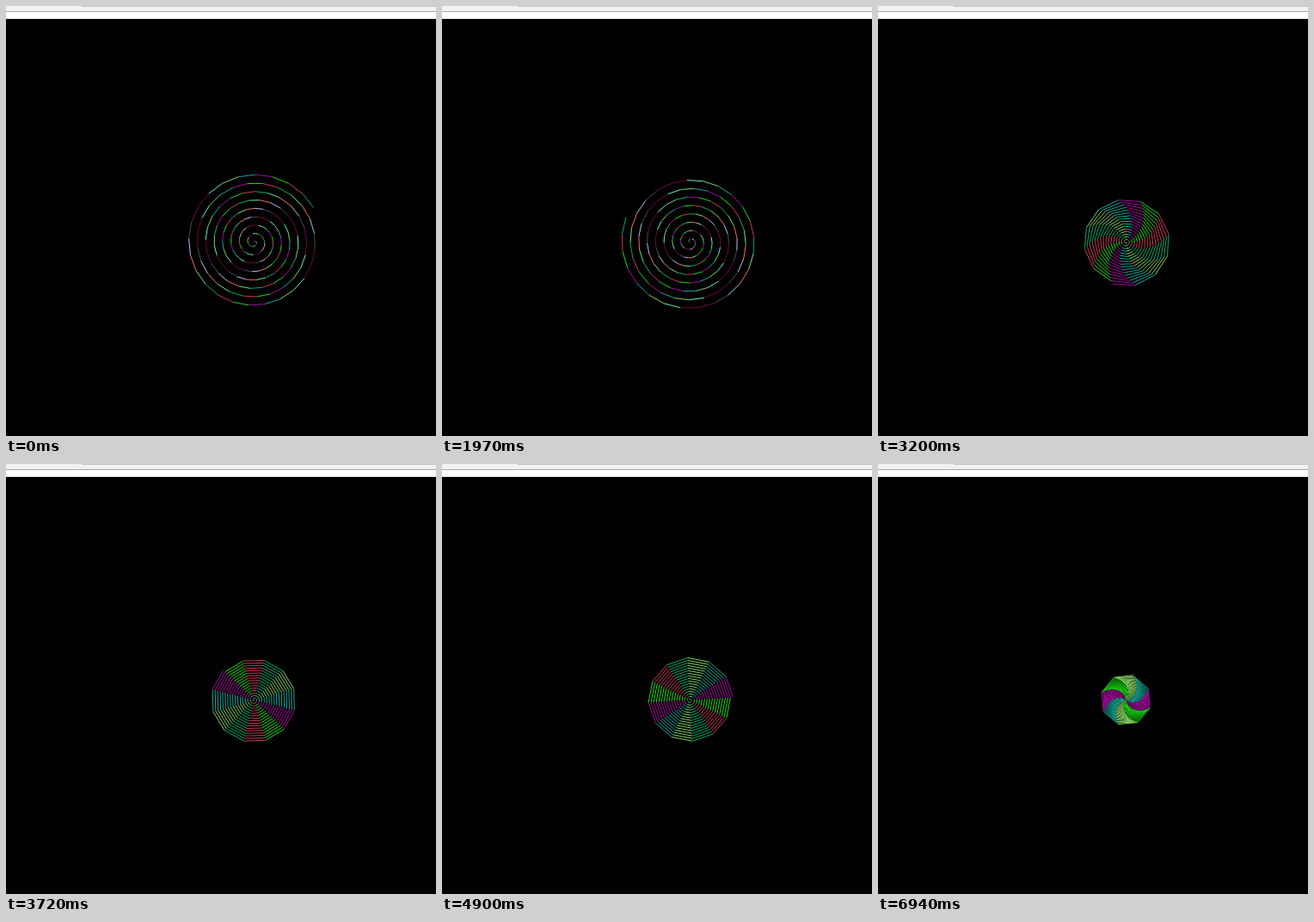
These frames come from a looping animation (500 px wide and 500 px high, 6.96 s). An HTML page with a canvas:

```html
<!DOCTYPE html>
<html>
<head>
<meta charset="utf-8">
<style>
html, body { margin: 0; width: 100%; height: 100%; overflow: hidden; background: #000; }
canvas { display: block; }
</style>
</head>
<body>
<canvas id="stage" width="500" height="500"></canvas>
<script>
const ctx = document.getElementById('stage').getContext('2d');
const LOOP = 6960, STEP = 40.8, LAST = 170;
const POINTS = 200, SPIN = 4.72;
const COLORS = ['#84d060', '#14a898', '#a4089c', '#18dc10', '#cc3854', '#04a868', '#74e084',
  '#ec7060', '#bcbcf0', '#4c4c4c', '#700454', '#70042c', '#64ecd8'];

// step, turn per point in degrees, radius per point, number of colours
const KEYS = [
  [0, 14.7, .4, 13],
  [59, 14.7, .4, 13],
  [68, 26.69, .336, 7],
  [80, 30, .25, 6],
  [145, 30, .25, 6],
  [158, 44.67, .15, 4],
  [LAST, 44.67, .15, 4]
];

function stateAt(step) {
  const k = Math.max(1, KEYS.findIndex(key => key[0] >= step));
  const a = KEYS[k - 1], b = KEYS[k];
  const p = (step - a[0]) / (b[0] - a[0]);
  return a.map((v, i) => v + (b[i] - v) * p);
}

function rect(color, x, y, w, h) {
  ctx.fillStyle = color;
  ctx.fillRect(x, y, w, h);
}

function drawPage() {
  rect('#000', 0, 0, 500, 500);
  rect('#fff', 0, 0, 500, 15);
  rect('#f2f2f2', 0, 0, 500, 6);
  rect('#c4c4c4', 88, 0, 412, 1);
  rect('#a8a8a8', 0, 6, 500, 1);
}

function drawSpiral(step) {
  const [, turn, gap, count] = stateAt(step);
  const n = Math.round(count);
  const point = i => {
    const a = (SPIN * step + turn * i - 90) * Math.PI / 180;
    return [288.5 + gap * i * Math.cos(a), 274.5 + gap * i * Math.sin(a)];
  };
  ctx.lineWidth = 1;
  for (let i = 1; i <= POINTS; i++) {
    ctx.strokeStyle = COLORS[i % n];
    ctx.beginPath();
    ctx.moveTo(...point(i - 1));
    ctx.lineTo(...point(i));
    ctx.stroke();
  }
}

const start = performance.now();
function frame() {
  const t = (performance.now() - start) % LOOP;
  drawPage();
  drawSpiral(Math.min(LAST, Math.floor((t + 35) / STEP)));
  requestAnimationFrame(frame);
}
frame();
</script>
</body>
</html>
```
